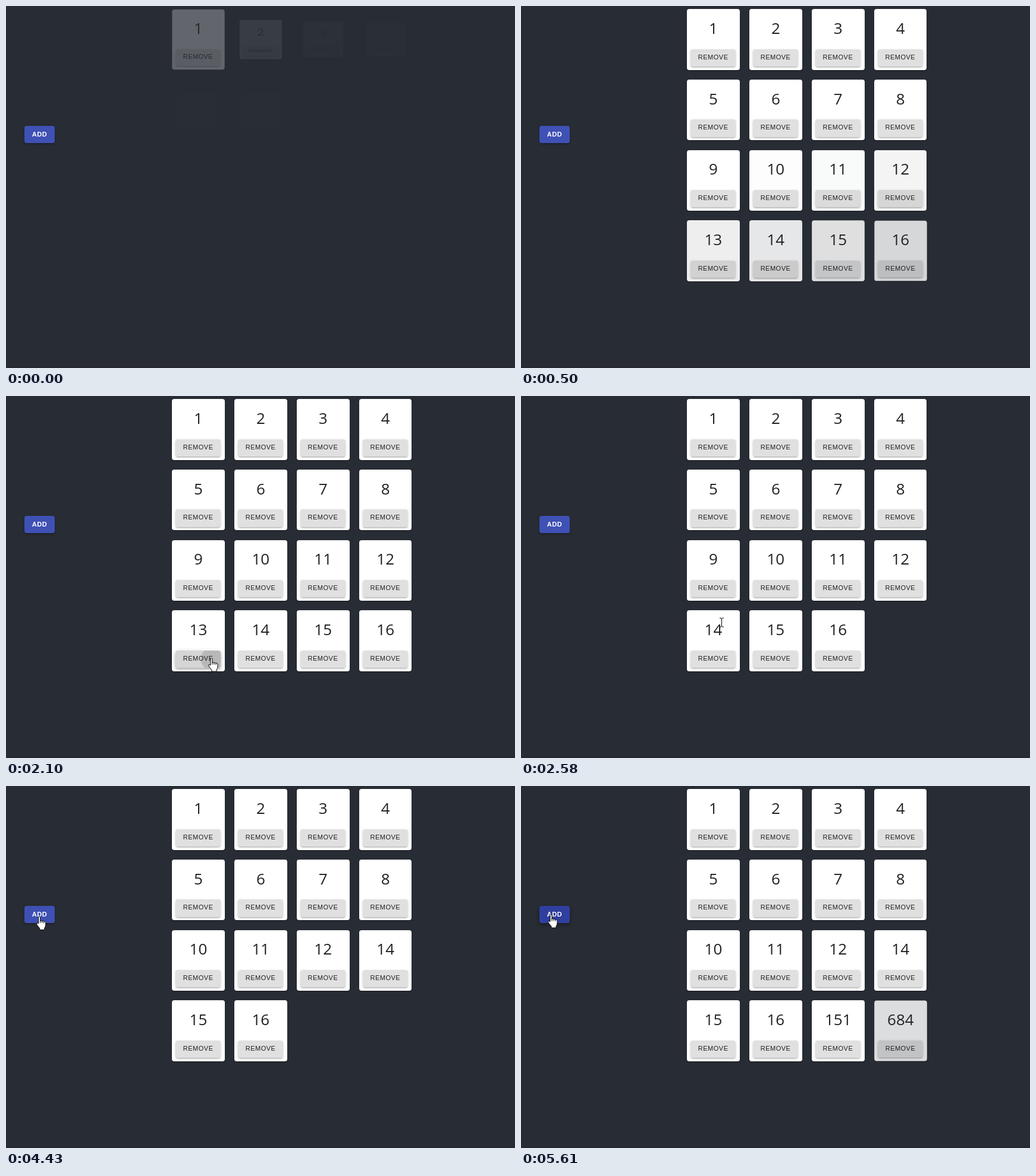
These frames come from a looping animation (856x610 px, 5.63 s). An HTML page:

```html
<!DOCTYPE html>
<html lang="en">
<head>
<meta charset="utf-8">
<title>Growing cards</title>
<style>
html, body { margin: 0; width: 100%; height: 100%; overflow: hidden; background: #282c34; }
body { position: relative; }
.card, .btn, .num, .ripple, #cursor { position: absolute; }
.card {
  width: 88.6px; height: 102.7px; border-radius: 4px; background: #fff;
  box-shadow: 0 2px 1px -1px #0003, 0 1px 1px #00000024, 0 1px 3px #0000001f;
}
.num {
  left: 0; top: 15.8px; width: 100%; text-align: center; color: #000000de;
  font: 26px/32px "Open Sans", "Noto Sans", sans-serif;
}
.btn {
  border-radius: 4px; overflow: hidden; text-align: center; letter-spacing: .5px;
  color: #000000de; font: 11px/27.3px "Liberation Sans", Arial, sans-serif;
}
.card .btn { left: 6px; top: 67.7px; width: 76px; height: 29.3px; }
#add {
  left: 31px; top: 202px; width: 51px; height: 29px; color: #fff;
  font-weight: bold; line-height: 28.5px;
}
.ripple { border-radius: 50%; background: currentColor; opacity: 0; }
#edge { position: absolute; left: 0; right: 0; bottom: 0; height: 2px; background: #26272f; }
#cursor { left: 0; top: 0; overflow: visible; }
</style>
</head>
<body>
<div id="edge"></div>
<div id="add" class="btn">ADD<i class="ripple"></i></div>
<svg id="cursor" width="1" height="1" fill="#fff" stroke="#000">
  <g id="arrow"><path d="M0 0V16L3.7 12.5 6 18 8.5 17 6.200 11.600H11.500Z"/></g>
  <g id="hand"><path d="M-1.500 12V1.500a1.500 1.500 0 0 1 3 0V7.500q1.500-1 3 .5 1.500-.8 3 .5 2-.5 3 1.200V14q0 3-2 6v2.500h-8V20q-3-3-5.500-7.500 0-2.500 2.500-1z"/><path d="M1.500 7v4M4.500 8v3M7.500 8.500v3"/></g>
  <g id="beam" fill="none"><path d="M-3-7.500H-1L.5-6.500 2-7.500H4M.5-6.500V6.500M-3 7.500H-1L.5 6.500 2 7.500H4"/></g>
</svg>
<script>
const LOOP = 5630, STEP = 64, EXIT = 350;
const $ = id => document.getElementById(id);
const clamp = x => Math.min(1, Math.max(0, x));

// cubic-bezier(.4, 0, .2, 1), solved by bisection
function ease(x) {
  if (x <= 0 || x >= 1) return clamp(x);
  let lo = 0, hi = 1, s;
  for (let i = 0; i < 24; i++) {
    s = (lo + hi) / 2;
    const u = 1 - s;
    if (1.2 * u * u * s + 0.6 * u * s * s + s * s * s < x) lo = s; else hi = s;
  }
  return s * s * (3 - 2 * s);
}

const removals = { 13: 2225, 9: 3480 };
const additions = { 151: 4585, 684: 5077 };
const hovers = { 13: 1850, 9: 3050 };
const presses = { 13: [1950, 2200], 9: [3360, 3470] };

// time, x, y, shape until the next point
const path = [
  [950, 16, 217, "arrow"], [1200, 60, 330, "arrow"], [1460, 170, 420, "arrow"],
  [1700, 300, 458, "arrow"], [1850, 345.5, 442, "hand"], [2200, 345.5, 441.5, "hand"],
  [2280, 343, 425, "arrow"], [2400, 338, 392, "beam"], [2500, 337, 382, "beam"],
  [2700, 337, 381, "beam"], [2800, 335, 363, "arrow"], [3050, 328.5, 322, "hand"],
  [3690, 328.5, 319.5, "hand"], [3780, 310, 317, "hand"], [3850, 282, 312, "arrow"],
  [4390, 62, 226, "hand"], [4450, 53.5, 217, "hand"], [5010, 53.5, 216.5, "hand"],
  [5610, 50.5, 216.5, "hand"], [LOOP, 50.5, 216.5, "hand"]
];

const slots = Array.from({ length: 16 }, (_, i) => {
  const card = document.createElement("div");
  card.className = "card";
  card.style.left = 279.15 + 104.9 * (i % 4) + "px";
  card.style.top = 5.1 + 118.7 * Math.floor(i / 4) + "px";
  card.innerHTML = '<div class="num"></div><div class="btn">REMOVE<i class="ripple"></i></div>';
  document.body.insertBefore(card, $("add"));
  return { card, num: card.firstChild, btn: card.lastChild };
});

function paintButton(btn, from, to, hover) {
  const mix = (a, b) => a + (b - a) * hover;
  btn.style.background = `rgb(${from.map((c, i) => Math.round(mix(c, to[i])))})`;
  btn.style.boxShadow = `0 ${mix(2.5, 2)}px ${mix(1, 4)}px ${mix(-2, -1)}px #0003,` +
    `0 ${mix(1.8, 3.5)}px ${mix(2, 5)}px #00000024, 0 1px ${mix(4.5, 9)}px #0000001f`;
}

function paintRipple(btn, t, x, y, r, press, release) {
  const scale = ease((t - press) / 550), style = btn.querySelector(".ripple").style;
  style.left = x - r + "px";
  style.top = y - r + "px";
  style.width = style.height = 2 * r + "px";
  style.transform = `scale(${scale})`;
  style.opacity = t < press ? 0 : (0.1 + 0.2 * scale) * (1 - ease((t - release) / 550));
}

function paintCard(slot, n, i, t) {
  slot.card.style.display = n ? "" : "none";
  if (!n) return;
  const age = t - (additions[n] ?? -10), span = STEP * i || 38;
  let opacity = ease(age / span);
  let grown = n === 1 ? Math.max(0.97, opacity) : ease(age / span / 0.666);
  if (t > removals[n]) {
    const p = (t - removals[n]) / EXIT;
    opacity = 1 - ease(p);
    grown = 1 - ease((p - 0.333) / 0.666);
  }
  const size = 0.75 + 0.25 * grown;
  slot.num.textContent = n;
  slot.card.style.opacity = opacity;
  slot.card.style.transform = grown < 1 ? `scale(${size}, ${size * size})` : "none";
  paintButton(slot.btn, [224, 224, 224], [213, 213, 213], n in hovers ? ease((t - hovers[n]) / 250) : 0);
  const [press, release] = presses[n] || [LOOP, LOOP];
  paintRipple(slot.btn, t, n === 9 ? 44 : 62, 14, n === 9 ? 47 : 65, press, release);
}

function paintCursor(t) {
  const k = path.findIndex(p => p[0] > t) - 1;
  $("cursor").style.display = k < 0 ? "none" : "";
  if (k < 0) return;
  const [t0, x0, y0, shape] = path[k], [t1, x1, y1] = path[k + 1];
  const p = (t - t0) / (t1 - t0);
  $("cursor").style.transform = `translate(${x0 + (x1 - x0) * p}px, ${y0 + (y1 - y0) * p}px)`;
  for (const id of ["arrow", "hand", "beam"]) $(id).style.display = id === shape ? "" : "none";
}

function draw(now) {
  let t = now % LOOP;
  if (t < 80) t = 0; // the opening pose holds briefly
  const list = Array.from({ length: 16 }, (_, i) => i + 1)
    .concat(151, 684)
    .filter(n => !(t >= removals[n] + EXIT) && !(t < additions[n]));
  slots.forEach((slot, i) => paintCard(slot, list[i], i, t));
  paintButton($("add"), [63, 81, 181], [48, 63, 159], ease((t - 4390) / 250));
  const second = t >= 4975;
  paintRipple($("add"), t, 22, 15, 34, second ? 4975 : 4480, second ? 5070 : 4580);
  paintCursor(t);
}

const begin = performance.now();
function tick() {
  draw(performance.now() - begin);
  requestAnimationFrame(tick);
}
tick();
</script>
</body>
</html>
```
